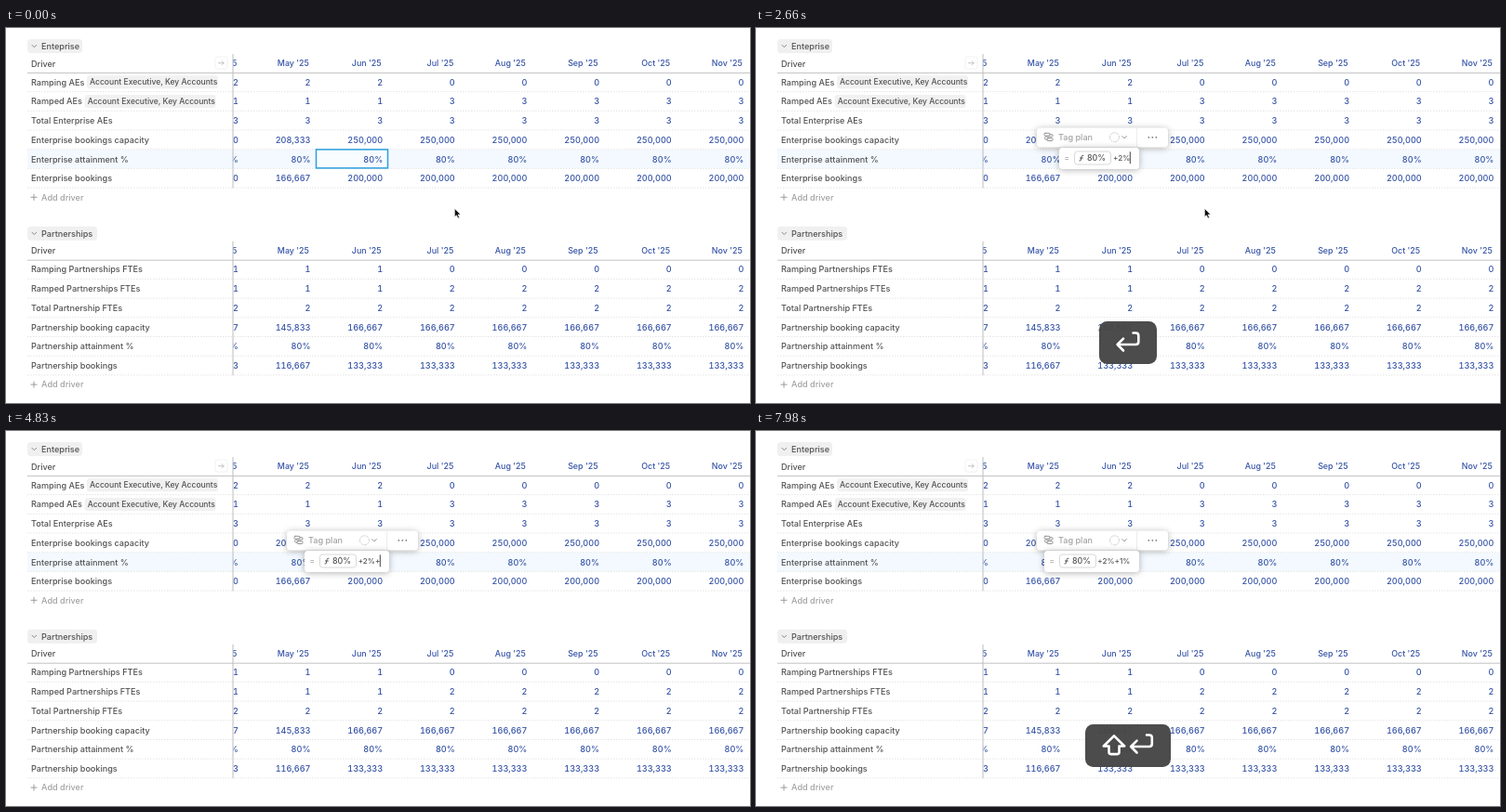
Write an HTML page that moves like this. It is 800 px wide and 404 px high and loops after 8000 ms.

```html
<!DOCTYPE html>
<html lang="en">
<head>
<meta charset="utf-8">
<style>
html, body { margin: 0; width: 100%; height: 100%; overflow: hidden; background: #fff; }
svg { display: block; width: 800px; height: 404px; font: 500 9.1px Inter, sans-serif; }
.label { fill: #525254; }
.num, .month { fill: #3553a6; text-anchor: end; }
.num { font-feature-settings: "tnum"; }
.month { font-size: 8.9px; }
.muted { fill: #a2a2a2; }
.line { fill: none; stroke-linecap: round; stroke-linejoin: round; }
.pop { fill: #fff; filter: drop-shadow(0 1.5px 3.5px rgba(0, 0, 0, .3)); }
</style>
</head>
<body>
<svg viewBox="0 0 800 404">
  <defs><clipPath id="cells"><rect x="244.5" width="556" height="404"/></clipPath></defs>
  <rect x="23" y="131" width="777" height="20" fill="#f3f9fe"/>
  <g id="table"></g>
  <path class="line" d="M228.5 37.7h5.6m-2-2l2 2-2 2" stroke="#b5b5b5" stroke-width=".8"/>
  <rect x="225" y="31" width="13" height="13" rx="2" fill="none" stroke="#f2f2f2"/>
  <rect id="selection" x="333.5" y="130.9" width="77" height="20" fill="#f8fcff" stroke="#2c9fdc" stroke-width="1.5"/>
  <text id="selected" class="num" x="405.2" y="144.5">80%</text>

  <g id="editor">
    <rect class="pop" x="302" y="107.5" width="141" height="21" rx="4"/>
    <g class="line" stroke="#8a8a8a" stroke-width=".9">
      <rect x="310" y="113.3" width="6" height="2.8" rx="1"/>
      <rect x="313" y="118.7" width="6" height="2.8" rx="1"/>
      <path d="M316 114.7h2.2q1 0 1 1v0q0 1.4-1.4 1.4h-6q-1.3 0-1.3 1.4t1.3 1.6h1.2"/>
      <path d="M393.8 116.6l2.3 2.3 2.3-2.3"/>
    </g>
    <text class="muted" x="325" y="121">Tag plan</text>
    <circle cx="385.5" cy="117.8" r="5" fill="none" stroke="#c4c4c4" stroke-dasharray="1.6 1"/>
    <path d="M409.5 108v20" stroke="#ececec"/>
    <g fill="#777"><circle cx="422.3" cy="117.8" r=".9"/><circle cx="426.3" cy="117.8" r=".9"/><circle cx="430.3" cy="117.8" r=".9"/></g>
    <rect id="box" class="pop" y="129" height="23" rx="3.5"/>
    <text id="equals" class="muted" y="143.2" font-size="8">=</text>
    <g id="chip">
      <rect x=".5" y="133" width="39" height="14" rx="3" fill="#fff" stroke="#d4d4d4" stroke-width=".9"/>
      <path class="line" d="M10 137.2q-1.6-.6-1.9 1.3l-.7 3.5q-.3 1.5-1.5 1.1M6.4 140h3" stroke="#4b4b4d" stroke-width=".9"/>
      <text class="label" x="14" y="143.2" font-size="8.9">80%</text>
    </g>
    <text id="formula" class="label" x="402.3" y="143.1" text-anchor="end" font-size="8.1"></text>
    <path id="caret" d="M0 133.3v13" stroke="#444" stroke-width="1"/>
  </g>

  <path id="pointer" d="M482.3 194.4v9.3l2.1-1.9 1.5 3.3 1.7-.8-1.5-3.2h2.9z" fill="#111" stroke="#fff" stroke-width=".7"/>

  <g id="keys">
    <rect id="keyBack" y="316" height="46" rx="8.5" fill="#474747" fill-opacity=".97"/>
    <g class="line" stroke="#fff" stroke-width="2.6">
      <path id="enter" d="M405.5 328.5h2.8q3 0 3 3v6.5q0 3-3 3H388.8M395 334.6l-6.4 6.4 6.4 6.5"/>
      <path id="shift" d="M385 328.3l-11.2 11.2h5.7v6.6q0 2 2 2h7q2 0 2-2v-6.6h5.7z"/>
    </g>
  </g>
</svg>
<script>
const $ = id => document.getElementById(id);
const LOOP = 8000, STEP = 70, BLINK = 495;
const OPEN = 690, COLUMN = 77.65, ROW = 20.7;
const months = ["Apr", "May", "Jun", "Jul", "Aug", "Sep", "Oct", "Nov"];
const tag = "Account Executive, Key Accounts";

// Each row: label, first three cells, value of every later cell, optional tag x
const sections = [
  { y: 0, title: "Enteprise", width: 59, rows: [
    ["Ramping AEs", "2", "2", "2", "0", 87],
    ["Ramped AEs", "1", "1", "1", "3", 84.7],
    ["Total Enterprise AEs", "3", "3", "3", "3"],
    ["Enterprise bookings capacity", "0", "208,333", "250,000", "250,000"],
    ["Enterprise attainment %", "80%", "80%", "", "80%"],
    ["Enterprise bookings", "0", "166,667", "200,000", "200,000"]] },
  { y: 201.8, title: "Partnerships", width: 75, rows: [
    ["Ramping Partnerships FTEs", "1", "1", "1", "0"],
    ["Ramped Partnerships FTEs", "1", "1", "1", "2"],
    ["Total Partnership FTEs", "2", "2", "2", "2"],
    ["Partnership booking capacity", "7", "145,833", "166,667", "166,667"],
    ["Partnership attainment %", "80%", "80%", "80%", "80%"],
    ["Partnership bookings", "3", "116,667", "133,333", "133,333"]] }
];

const text = (cls, x, y, s, extra = "") => `<text class="${cls}" x="${x}" y="${y}" ${extra}>${s}</text>`;
const cells = (cls, x, y, value) => months.map((m, i) => text(cls, x + i * COLUMN, y, value(m, i))).join("");

function drawSection({ y, title, width, rows }) {
  let out = `<rect x="23" y="12" width="${width}" height="15" rx="3.5" fill="#f0f0f0"/>
    <path class="line" d="M28 18.4l2.3 2.3 2.3-2.3" stroke="#888"/>
    <path d="M23 48.4H800" stroke="#c2c2c2"/><path d="M244 28V172.5" stroke="#bcbcbc"/>`;
  out += text("label", 38, 22.8, title) + text("label", 27, 41.6, "Driver");
  let values = cells("month", 248.3, 41.1, m => m + " '25");
  rows.forEach(([label, a, b, c, rest, tagX], i) => {
    const base = 61.7 + i * ROW, edge = 68.6 + i * ROW;
    out += text("label", 27, base, label);
    out += `<path d="M23 ${edge}H800" stroke="#dedede" stroke-width=".8" stroke-dasharray="1.5 1.5"/>`;
    if (tagX) out += `<rect x="${tagX}" y="${base - 10.4}" width="141" height="14" rx="3" fill="#f1f1f1"/>` +
      text("label", tagX + 3, base - .3, tag, 'font-size="8.55"');
    values += cells("num", 249.8, base, (m, j) => [a, b, c][j] ?? rest);
  });
  out += '<path d="M26.5 182.3h7m-3.5-3.5v7" stroke="#9c9c9c"/>' + text("muted", 38, 185.7, "Add driver");
  return `<g transform="translate(0 ${y})">${out}</g><g clip-path="url(#cells)"><g transform="translate(0 ${y})">${values}</g></g>`;
}
$("table").innerHTML = sections.map(drawSection).join("");

// Moment each character is typed, and where the chip then starts
const typed = [[OPEN, "", 364], [1670, "+", 353], [2160, "+2", 348], [2650, "+2%", 342],
  [3360, "+2%+", 337], [4960, "+2%+1", 331.5], [5430, "+2%+1%", 326]];

const ramp = (t, from, to) => Math.min(1, Math.max(0, (t - from) / (to - from)));
const show = (id, on) => $(id).setAttribute("visibility", on ? "visible" : "hidden");

function render(now) {
  const t = now % LOOP;
  const tick = Math.floor(t / STEP) * STEP;
  const open = tick >= OPEN;
  show("selection", !open);
  show("selected", !open);
  $("editor").setAttribute("display", open ? "inline" : "none");
  if (open) {
    const [since, formula, chipX] = typed.filter(k => k[0] <= tick).pop();
    const left = Math.min(332, chipX - 16);
    $("box").setAttribute("x", left);
    $("box").setAttribute("width", 412 - left);
    $("equals").setAttribute("x", left + 5.5);
    $("chip").setAttribute("transform", `translate(${chipX} 0)`);
    $("formula").textContent = formula;
    $("caret").setAttribute("transform", `translate(${formula ? 402.3 : 406.5} 0)`);
    show("caret", Math.floor((tick - since) / BLINK) % 2 === 0);
  }
  $("pointer").setAttribute("opacity", 1 - ramp(tick, 2870, 3150));

  const combo = tick >= 7910;
  const alpha = combo ? ramp(tick, 7770, 7980) : ramp(tick, 560, 840) * (1 - ramp(tick, 3920, 4200));
  $("keys").setAttribute("opacity", alpha);
  $("keyBack").setAttribute("x", combo ? 354 : 369);
  $("keyBack").setAttribute("width", combo ? 92 : 62);
  $("enter").setAttribute("transform", `translate(${combo ? 14.5 : 0} ${combo ? -1 : 0})`);
  $("shift").setAttribute("display", combo ? "inline" : "none");
}

const start = performance.now();
function frame() {
  render(performance.now() - start);
  requestAnimationFrame(frame);
}
render(0);
requestAnimationFrame(frame);
</script>
</body>
</html>
```
